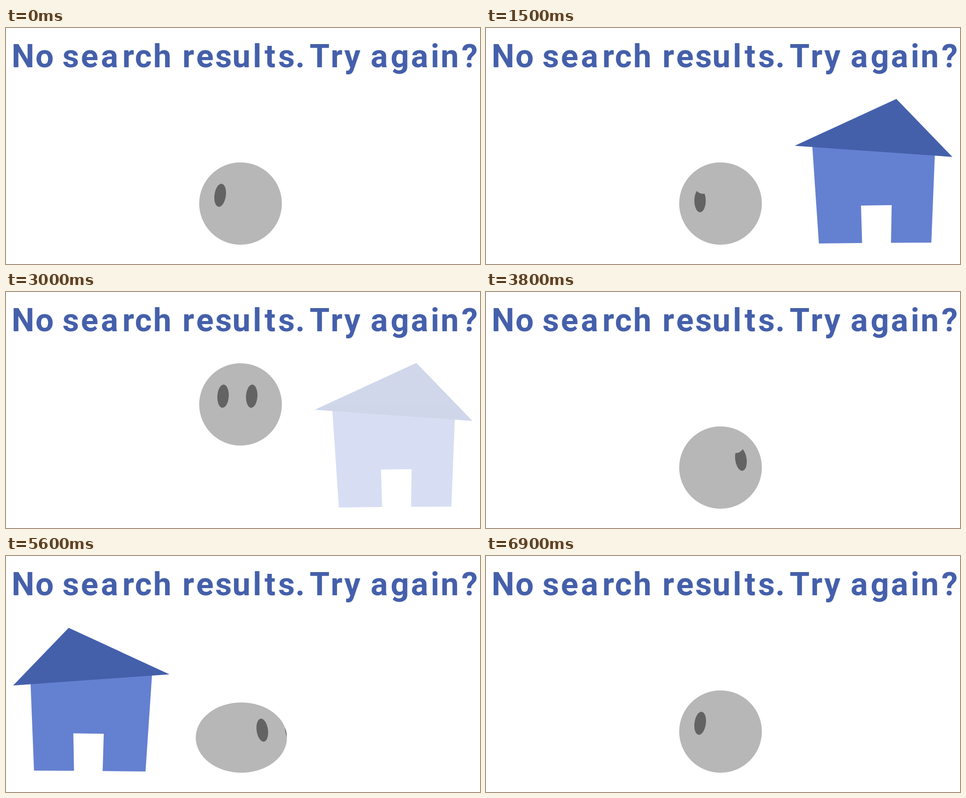
An HTML page that plays this animation: 1058x529 px, repeating every 7 s.

```html
<!DOCTYPE html>
<html lang="en">
<head>
<meta charset="utf-8">
<title>No search results</title>
<style>
  html, body { margin: 0; width: 100%; height: 100%; overflow: hidden; background: #fff; }
  svg { display: block; width: 100%; height: 100%; }
  .title { font: 700 72px Roboto, "Open Sans", sans-serif; text-anchor: middle; fill: #4560ab; }
  .roof { fill: #4560ab; }
  .wall { fill: #6480d0; }
  .ball, .lid { fill: #b7b7b7; }
  .eye ellipse { fill: #636363; }
</style>
</head>
<body>
<svg viewBox="0 0 1058 529">
  <defs>
    <clipPath id="inside"><ellipse class="ball"/></clipPath>
    <g id="house">
      <path class="wall" d="M728 260L743 483L839.5 482L837 398L905.5 397L904 481.500L994 481L1002 280Z"/>
      <path class="roof" d="M689 264L916 159L1041 289Z"/>
    </g>
  </defs>

  <text class="title" y="88" x="38 86 115 144.500 186.500 231 273 306.500 349 378 407 444 485.500 525.500 560.500 589.500 626 656.500 673 700 738 773 800 833 879 923 957.500 990.500 1035">No search results. Try again?</text>

  <use class="house" href="#house" opacity="0"/>
  <use class="house" href="#house" opacity="0" transform="matrix(-.9915 0 0 .9938 1048.1 3)"/>

  <ellipse class="ball"/>
  <g clip-path="url(#inside)">
    <g class="eye"><ellipse rx="12.7" ry="26"/><circle class="lid" r="18"/></g>
    <g class="eye"><ellipse rx="12.7" ry="26"/><circle class="lid" r="18"/></g>
  </g>
</svg>

<script>
  const LOOP = 7000, STEP = 100;
  const CX = 523.5, FLOOR = 485.8, R = 92.3;

  // The second act mirrors the first; only its opening is timed differently.
  const acts = [
    { start: 0,    dir: 1,  lid: 100, droop: 300, fade: 600, lean: 1.3, look: -1.3 },
    { start: 3300, dir: -1, lid: 500, droop: 600, fade: 600, lean: 2.6, look: 4.4 }
  ];

  const all = name => [...document.querySelectorAll(name)];
  const balls = all(".ball"), eyes = all(".eye"), lids = all(".lid"), houses = all(".house");

  const ramp = (t, from, to) => Math.min(1, Math.max(0, (t - from) / (to - from)));
  const set = (el, attrs) => {
    for (const key in attrs) el.setAttribute(key, attrs[key]);
  };

  function jumpHeight(t) {
    const away = t < 3000 ? 1 - ramp(t, 2350, 3000) : ramp(t, 3000, 3600);
    return 141.5 * (1 - away * away);
  }

  function draw(time) {
    const index = time < 3700 ? 0 : 1;
    const act = acts[index], dir = act.dir;
    const t = time - act.start;

    const droop = ramp(t, act.droop, act.droop + 400) - ramp(t, 1300, 1700);
    const squash = ramp(t, 1500, 2100) - ramp(t, 2200, 2533);
    const shown = ramp(t, act.fade, act.fade + 400) - ramp(t, 2700, 3100);
    const turn = ramp(t, 2500, 3600);
    const sad = t >= act.lid && t < 1700;
    const lift = jumpHeight(t);

    houses.forEach((house, i) => set(house, { opacity: i === index ? shown : 0 }));

    const ry = R * (1 - 0.21 * squash);
    balls.forEach(ball => set(ball, {
      cx: CX + act.lean * squash,
      cy: FLOOR - ry - lift,
      rx: R * (1 + 0.147 * squash),
      ry
    }));

    const faceX = CX + dir * (155 * turn - 77.5 - 0.5 * droop) + act.look * squash;
    const faceY = 375 + 24 * droop + 22 * squash - lift;
    const tilt = dir * (8 - 16 * turn ** 1.6 - 16 * droop);
    eyes.forEach((eye, i) => set(eye, {
      transform: `translate(${faceX + (i ? 32 : -32)} ${faceY}) rotate(${tilt})`
    }));
    lids.forEach(lid => set(lid, {
      cx: dir * 6.9,
      cy: -33.3,
      visibility: sad ? "visible" : "hidden"
    }));
  }

  const begin = performance.now();
  function tick() {
    const time = (performance.now() - begin) % LOOP;
    draw(Math.floor(time / STEP) * STEP);
    requestAnimationFrame(tick);
  }
  tick();
</script>
</body>
</html>
```
